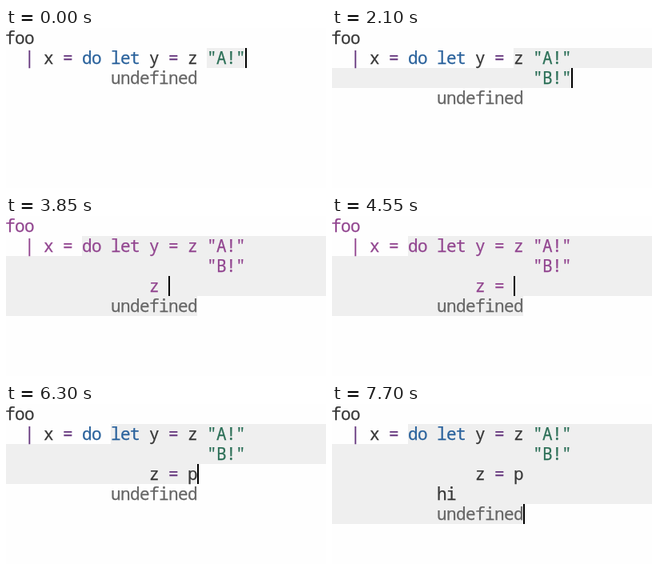
An HTML page for the animation above (8000 ms loop, 400x200 px).

```html
<!DOCTYPE html>
<html lang="en">
<head>
<meta charset="utf-8">
<title>Structural editing</title>
<style>
  html, body { margin: 0; width: 100%; height: 100%; overflow: hidden; background: #fefefe; }
  svg { display: block; width: 400px; height: 200px; }
  text {
    font: 21px "Noto Sans Mono", "DejaVu Sans Mono", monospace;
    letter-spacing: -0.6px;
    stroke: currentColor;
    stroke-width: 0.25px;
    fill: currentColor;
  }
</style>
</head>
<body>
<svg id="stage" viewBox="0 0 400 200"></svg>
<script>
const STEP = 350, LOOP = 8000;
const CELL = 12, ROW = 25, LEFT = -1, BASELINE = 20, WIDTH = 400;
const INK = '#383838', ERROR = '#924690', SHADE = '#efefef';

const stage = document.getElementById('stage');
const colX = col => LEFT + col * CELL;
const indent = (col, text) => ' '.repeat(col) + text;

// Lines between the heading and the closing "undefined".
const FIRST = '  | x = do let y = z "A!"';
const second = text => indent(21, text);
const third = text => indent(15, text);
const fourth = text => indent(11, text);

// A selection is [first row, first column, last row, end column].
const block = lastRow => [1, 8, lastRow, 20];
const steps = [];
const add = (extra, cursor, selection, broken = false) =>
  steps.push({ lines: ['foo', FIRST, ...extra, indent(11, 'undefined')], cursor, selection, broken });

// A second argument; the closing quote is inserted with the opening one.
add([], [1, 25], [1, 21, 1, 25]);
add([''], [2, 21], block(3));
for (const typed of ['', 'B', 'B!']) {
  const end = 23 + typed.length;
  add([second(`"${typed}"`)], [2, end - 1], [2, 21, 2, end]);
}
const argument = second('"B!"');
add([argument], [2, 25], [2, 21, 2, 25]);
for (const col of [19, 17, 15]) add([argument], [2, 25], [1, col, 2, 25]);

// A second binding, unparsable until it has a value.
add([argument, ''], [3, 15], block(4));
for (const typed of ['z', 'z ', 'z =', 'z = '])
  add([argument, third(typed)], [3, 15 + typed.length], block(4), true);
const bindings = [argument, third('z = p')];
for (const [row, col] of [[3, 19], [3, 17], [3, 15], [1, 15], [1, 11]])
  add(bindings, [3, 20], [row, col, 3, 20]);

// A new statement.
add([...bindings, ''], [4, 11], block(5));
for (const typed of ['h', 'hi'])
  add([...bindings, fourth(typed)], [4, 11 + typed.length], [4, 11, 4, 11 + typed.length]);
add([...bindings, fourth('hi')], [5, 20], block(5));

function tokenColor(token, broken) {
  if (token === 'undefined') return '#666666';
  if (broken) return ERROR;
  if (token[0] === '"') return '#2d7058';
  if (/^(do|let)$/.test(token)) return '#2a629c';
  if (/^[|=]$/.test(token)) return '#67397f';
  return INK;
}

function rect(x, y, width, fill) {
  return `<rect x="${x}" y="${y}" width="${width}" height="${ROW}" fill="${fill}"/>`;
}

function drawSelection([top, startCol, bottom, endCol]) {
  let out = '';
  for (let row = top; row <= bottom; row++) {
    const start = row === top ? colX(startCol) : 0;
    const end = row === bottom ? colX(endCol) : WIDTH;
    out += rect(start, row * ROW, end - start, SHADE);
  }
  return out;
}

function drawLine(line, row, broken) {
  return [...line.matchAll(/"[^"]*"|\w+|[|=]/g)].map(({ 0: token, index }) =>
    `<text x="${colX(index)}" y="${row * ROW + BASELINE}" color="${tokenColor(token, broken)}">${token}</text>`
  ).join('');
}

function draw({ lines, cursor: [row, col], selection, broken }) {
  stage.innerHTML = drawSelection(selection)
    + lines.map((line, i) => drawLine(line, i, broken)).join('')
    + rect(colX(col), row * ROW, 2, '#000000');
}

let shown = -1;
function update(now) {
  const index = Math.floor((now % LOOP) / STEP);
  if (index !== shown) draw(steps[shown = index]);
}

const began = performance.now();
function tick() {
  update(performance.now() - began);
  requestAnimationFrame(tick);
}
tick();
</script>
</body>
</html>
```
